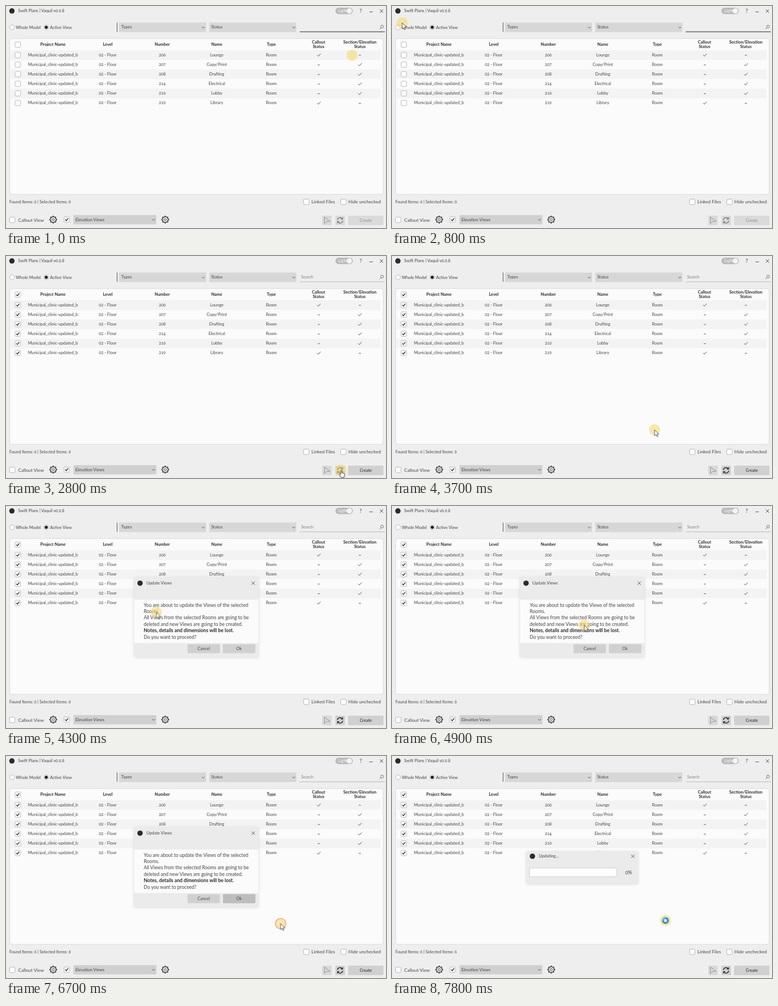
Animation, 676 px wide and 396 px high, one loop 7.9 s. Source, as an HTML page:

```html
<!DOCTYPE html>
<html lang="en">
<head>
<meta charset="utf-8">
<title>Update views</title>
<style>
html, body { margin: 0; width: 100%; height: 100%; overflow: hidden; background: #eeeeee; }
svg { display: block; width: 676px; height: 396px; }
text { font: 7.45px Lato, "Open Sans", sans-serif; font-variant-numeric: oldstyle-nums; fill: #444; white-space: pre; }
.mid { text-anchor: middle; }
.bold { font-weight: 700; fill: #2a2a2a; }
.opt { font-size: 8.2px; }
.msg { font-size: 8.5px; }
.line { fill: none; stroke: #444; stroke-width: .9; }
.box { fill: #fdfdfd; stroke: #a9a9a9; stroke-width: .8; }
.tick { fill: none; stroke: #222; stroke-width: 1.3; }
.pick { fill: #d7d7d7; }
.btn { fill: #d0d0d0; }
.panel { fill: #ebebeb; filter: drop-shadow(0 1px 2px rgba(0,0,0,.12)); }

.before, .after, .confirm, .progress, .arrow, .hand, .busy, .tap, .ring, .hot {
  animation: 7.9s step-end infinite;
}
.before { animation-name: before; }
.after { animation-name: after; }
.confirm { animation-name: confirm; }
.progress, .busy { animation-name: progress; }
.arrow { animation-name: arrow; }
.hand { animation-name: hand; }
.tap { animation-name: tap; }
.ring { animation-name: ring; }
.hot { animation-name: hot; }
.pointer { animation: travel 7.9s infinite; }
.spin { animation: spin .8s steps(8) infinite; }

@keyframes before { 0% { opacity: 1 } 27.848%, 100% { opacity: 0 } }
@keyframes after { 0% { opacity: 0 } 27.848%, 100% { opacity: 1 } }
@keyframes confirm { 0% { opacity: 0 } 48.101% { opacity: 1 } 88.607%, 100% { opacity: 0 } }
@keyframes progress { 0% { opacity: 0 } 88.607%, 100% { opacity: 1 } }
@keyframes arrow {
  0% { opacity: 0 } 1.265% { opacity: 1 } 16.455% { opacity: 0 } 21.518% { opacity: 1 }
  32.911% { opacity: 0 } 39.24% { opacity: 1 } 88.607%, 100% { opacity: 0 }
}
@keyframes hand {
  0% { opacity: 0 } 16.455% { opacity: 1 } 21.518% { opacity: 0 }
  32.911% { opacity: 1 } 39.24%, 100% { opacity: 0 }
}
@keyframes tap {
  0% { opacity: 0 } 18.987% { opacity: .6 } 21.518% { opacity: 0 }
  36.708% { opacity: .6 } 37.974% { opacity: 0 }
  78.481% { opacity: .6 } 79.746%, 100% { opacity: 0 }
}
@keyframes ring { 0% { opacity: 0 } 83.544% { opacity: 1 } 86.075%, 100% { opacity: 0 } }
@keyframes hot { 0% { opacity: 0 } 81.012% { opacity: 1 } 88.607%, 100% { opacity: 0 } }
@keyframes spin { to { transform: rotate(360deg) } }
@keyframes travel {
  0% { transform: translate(615.5px, 88px); animation-timing-function: steps(1) }
  1.265% { transform: translate(630px, 104px); animation-timing-function: steps(2) }
  3.797% { transform: translate(520px, 148px); animation-timing-function: steps(2) }
  6.329% { transform: translate(250px, 110px); animation-timing-function: steps(3) }
  10.126% { transform: translate(18px, 30px); animation-timing-function: steps(2) }
  12.658% { transform: translate(19px, 33px); animation-timing-function: steps(4) }
  17.721%, 20.253% { transform: translate(38.5px, 69px); animation-timing-function: steps(4) }
  25.316%, 26.582% { transform: translate(413px, 239px); animation-timing-function: steps(6) }
  34.177%, 36.708% { transform: translate(595.5px, 382px); animation-timing-function: steps(7) }
  45.569%, 46.835% { transform: translate(467px, 310px); animation-timing-function: steps(5) }
  53.164%, 54.43% { transform: translate(267.5px, 189.5px); animation-timing-function: steps(2) }
  56.962% { transform: translate(300px, 178px); animation-timing-function: steps(8) }
  67.088% { transform: translate(384px, 247px); animation-timing-function: steps(3) }
  70.886% { transform: translate(338.5px, 245.5px); animation-timing-function: steps(4) }
  75.949%, 79.746% { transform: translate(410.5px, 255px); animation-timing-function: steps(4) }
  84.81% { transform: translate(488.5px, 299px); animation-timing-function: steps(1) }
  88.607%, 100% { transform: translate(486.5px, 293.5px); animation-timing-function: steps(1) }
}
</style>
</head>
<body>
<svg viewBox="0 0 676 396">
  <defs>
    <rect id="box" class="box" x="-4.8" y="-4.8" width="9.6" height="9.6" rx="1.5"/>
    <path id="tick" class="tick" d="M-2.6 0L-.7 2L2.7 -2.3"/>
    <path id="chevron" class="line" d="M-2.4 -1.2L0 1.2L2.4 -1.2"/>
    <path id="cross" class="line" d="M-2.9 -2.9L2.9 2.9M2.9 -2.9L-2.9 2.9"/>
    <g id="gear"><path class="line" style="stroke:#222;stroke-width:1.2"/><circle class="line" r="2"/></g>
    <g id="cycle">
      <path class="line" style="stroke:inherit;stroke-width:1.3" d="M-4.8 -.8A4.8 4.8 0 0 1 3.8 -2.9M4.8 .8A4.8 4.8 0 0 1 -3.8 2.9"/>
      <path class="line" style="stroke:inherit;stroke-width:1.2" d="M4.6 -5.6V-2.3H1.4M-4.6 5.6V2.3H-1.4"/>
    </g>
  </defs>

  <rect width="676" height="396" fill="#eeeeee"/>
  <circle cx="10.5" cy="8.8" r="4.8" fill="#2b2b2b"/>
  <text x="21.5" y="11.3">Swift Plans | Vaquil v0.9.8</text>
  <rect x="586" y="3" width="31" height="11.5" rx="5.7" fill="#b9b9b9"/>
  <text x="591" y="11.4" style="fill:#fff">Light</text>
  <circle cx="610.8" cy="8.7" r="4.7" fill="#f4f4f4"/>
  <text class="mid" x="631" y="12.2" style="font-size:10px">?</text>
  <path class="line" d="M646.5 10.5H652.5"/>
  <use href="#cross" x="668" y="9"/>

  <circle class="box" cx="10.8" cy="38" r="4.3"/>
  <text x="17.4" y="40.7">Whole Model</text>
  <circle class="box" cx="71.6" cy="38" r="4.3"/>
  <circle cx="71.6" cy="38" r="2.8" fill="#111"/>
  <text x="78.3" y="40.7">Active View</text>

  <path class="line" d="M197.6 29.5V46"/>
  <rect class="pick" x="201" y="29.5" width="155" height="17" rx="1"/>
  <text x="205" y="40.4">Types</text>
  <use href="#chevron" x="351" y="38.3"/>
  <rect class="pick" x="361.5" y="29.5" width="155" height="17" rx="1"/>
  <text x="365" y="40.4">Status</text>
  <use href="#chevron" x="512" y="38.3"/>
  <path class="line before" d="M522.5 46H674" style="stroke:#222;stroke-width:1.2"/>
  <g class="after">
    <path class="line" d="M522.5 46H674" style="stroke:#b0b0b0"/>
    <text x="525" y="40.4" style="fill:#808080">Search</text>
  </g>
  <g class="line" style="stroke:#666"><circle cx="669" cy="36.7" r="2.5"/><path d="M667.2 38.6L664.6 41.2"/></g>

  <rect x="6.5" y="58" width="664.5" height="278" rx="4" fill="#fbfbfb" stroke="#dadada"/>
  <g id="table"></g>

  <g class="before"><text x="6" y="352.2">Found Items: 6 | Selected Items: 0</text></g>
  <g class="after"><text x="6" y="352.2">Found Items: 6 | Selected Items: 6</text></g>
  <use href="#box" x="534.3" y="349.3"/>
  <text class="opt" x="543.3" y="352.2">Linked Files</text>
  <use href="#box" x="600.3" y="349.3"/>
  <text class="opt" x="609" y="352.2">Hide unchecked</text>

  <use href="#box" x="11.2" y="381.5"/>
  <text class="opt" x="21.8" y="384.5">Callout View</text>
  <use href="#gear" x="84" y="381"/>
  <use href="#box" x="108" y="381"/>
  <use href="#tick" x="108" y="381"/>
  <rect class="btn" x="120" y="373" width="147.5" height="16.5" rx="1"/>
  <text x="123.5" y="383.6">Elevation Views</text>
  <use href="#chevron" x="262.5" y="381.3"/>
  <use href="#gear" x="283.3" y="381"/>

  <rect x="562.5" y="374" width="17" height="17" rx="1" fill="#d9d9d9"/>
  <path class="line" style="stroke:#8b8b8b" d="M566.5 376.5V387.8L570.2 384.5L576.6 384.1Z"/>
  <g class="before">
    <rect x="586" y="374" width="17" height="17" rx="1" fill="#dadada"/>
    <use href="#cycle" x="594.3" y="382.4" stroke="#777"/>
    <rect x="608.5" y="374" width="63" height="17" rx="1" fill="#dadada"/>
    <text class="mid" x="640" y="384.8" style="fill:#8b8b8b">Create</text>
  </g>
  <g class="after">
    <rect class="btn" x="586" y="374" width="17" height="17" rx="1"/>
    <use href="#cycle" x="594.3" y="382.4" stroke="#222"/>
    <rect class="btn" x="608.5" y="374" width="63" height="17" rx="1"/>
    <text class="mid" x="640" y="384.8" style="fill:#222">Create</text>
  </g>

  <g class="confirm">
    <rect class="panel" x="227.5" y="126.5" width="222" height="143" rx="3"/>
    <rect x="228" y="167" width="221" height="77.5" fill="#fbfbfb"/>
    <circle cx="238.5" cy="137.7" r="4.8" fill="#2b2b2b"/>
    <text x="249.8" y="139.8">Update Views</text>
    <use href="#cross" x="439.8" y="137.7"/>
    <text class="msg" x="245" y="179.6">You are about to update the Views of the selected</text>
    <text class="msg" x="245" y="191">Rooms.</text>
    <text class="msg" x="245" y="202.4">All Views from the selected Rooms are going to be</text>
    <text class="msg" x="245" y="213.8">deleted and new Views are going to be created.</text>
    <text class="msg bold" x="245" y="225.2" style="font-size:8.7px">Notes, details and dimensions will be lost.</text>
    <text class="msg" x="245" y="236.7">Do you want to proceed?</text>
    <rect class="btn" x="323" y="246.5" width="57.5" height="16" rx="1"/>
    <text class="mid" x="351.8" y="257">Cancel</text>
    <rect class="btn" x="386" y="246.5" width="57.5" height="16" rx="1"/>
    <rect class="hot" x="386" y="246.5" width="57.5" height="16" rx="1" fill="#bdbdbd"/>
    <text class="mid" x="414.5" y="257">Ok</text>
  </g>

  <g class="progress">
    <rect class="panel" x="238.5" y="169.5" width="199.5" height="58.5" rx="3"/>
    <circle cx="249.8" cy="178.8" r="4.8" fill="#2b2b2b"/>
    <text x="261.3" y="181.2">Updating...</text>
    <use href="#cross" x="428.5" y="178.8"/>
    <rect x="244.5" y="199.8" width="155.5" height="15.6" rx="2" fill="#fdfdfd" stroke="#c2c2c2" stroke-width=".8"/>
    <text class="mid" x="421" y="210.8" style="font-size:9px">0%</text>
  </g>

  <g class="pointer">
    <circle r="10" fill="#f6da78" opacity=".62"/>
    <circle class="tap" r="6" fill="#ee5a50"/>
    <circle class="ring" r="9.3" fill="none" stroke="#f3aa96" stroke-width="1.6"/>
    <path class="arrow" d="M0 0V10.7L2.5 8.4L4.2 12.2L6 11.4L4.4 7.7H7.7Z" fill="#fff" stroke="#333" stroke-width=".8"/>
    <path class="hand" d="M-.2 1.2Q1 -.6 2 1.2V5Q3.2 4.2 3.7 5.4Q5 4.7 5.4 6Q6.9 5.6 6.9 7.4V9.5L5.8 13H.6L-2.6 8.3Q-2.2 6.6 -.2 8Z" fill="#fff" stroke="#222" stroke-width=".9"/>
    <g class="busy">
      <circle r="6.2" fill="#f7f3e6"/>
      <circle r="4.4" fill="none" stroke="#2c87cf" stroke-width="3.4"/>
      <path class="spin" d="M0 -4.4A4.4 4.4 0 0 1 4.4 0" fill="none" stroke="#58b4ee" stroke-width="3"/>
    </g>
  </g>
</svg>
<script>
const columns = [83.5, 181, 278, 375, 472];
const rooms = [
  [206, "Lounge", 1], [207, "Copy/Print", 0], [208, "Drafting", 0],
  [214, "Electrical", 0], [216, "Lobby", 0], [219, "Library", 1]
];
const label = (s, x, y, cls = "") => `<text class="mid ${cls}" x="${x}" y="${y}">${s}</text>`;
const checkbox = y => `<use href="#box" x="21" y="${y}"/><g class="after"><use href="#tick" x="21" y="${y}"/></g>`;
const status = (on, x, y) => on
  ? `<path class="line" d="M${x - 3} ${y}l2.2 2.3l4 -4.6"/>`
  : `<path class="line" d="M${x - 1.8} ${y + .5}h3.6"/>`;

let out = checkbox(69);
["Project Name", "Level", "Number", "Name", "Type"].forEach((s, i) => out += label(s, columns[i], 71.2, "bold"));
[["Callout", 556], ["Section/Elevation", 629.5]].forEach(([s, x]) =>
  out += label(s, x, 67, "bold") + label("Status", x, 75, "bold"));

rooms.forEach(([number, name, callout], i) => {
  const y = 87.4 + i * 17.12;
  if (i % 2 === 0) out += `<rect x="8" y="${y - 8.5}" width="658.5" height="17.1" fill="#f3f3f3"/>`;
  out += checkbox(y);
  ["Municipal_clinic-updated_b", "02 - Floor", number, name, "Room"]
    .forEach((s, c) => out += label(s, columns[c], y + 2.4));
  out += status(callout, 556.5, y) + status(!callout, 629.5, y);
});
document.getElementById("table").innerHTML = out;

// Eight teeth, four corners each
const teeth = Array.from({ length: 32 }, (_, i) => {
  const a = (i - 1.5) * Math.PI / 16, r = i % 4 === 1 || i % 4 === 2 ? 6.2 : 4.6;
  return `${(r * Math.cos(a)).toFixed(2)} ${(r * Math.sin(a)).toFixed(2)}`;
});
document.querySelector("#gear path").setAttribute("d", `M${teeth.join("L")}Z`);
</script>
</body>
</html>
```
